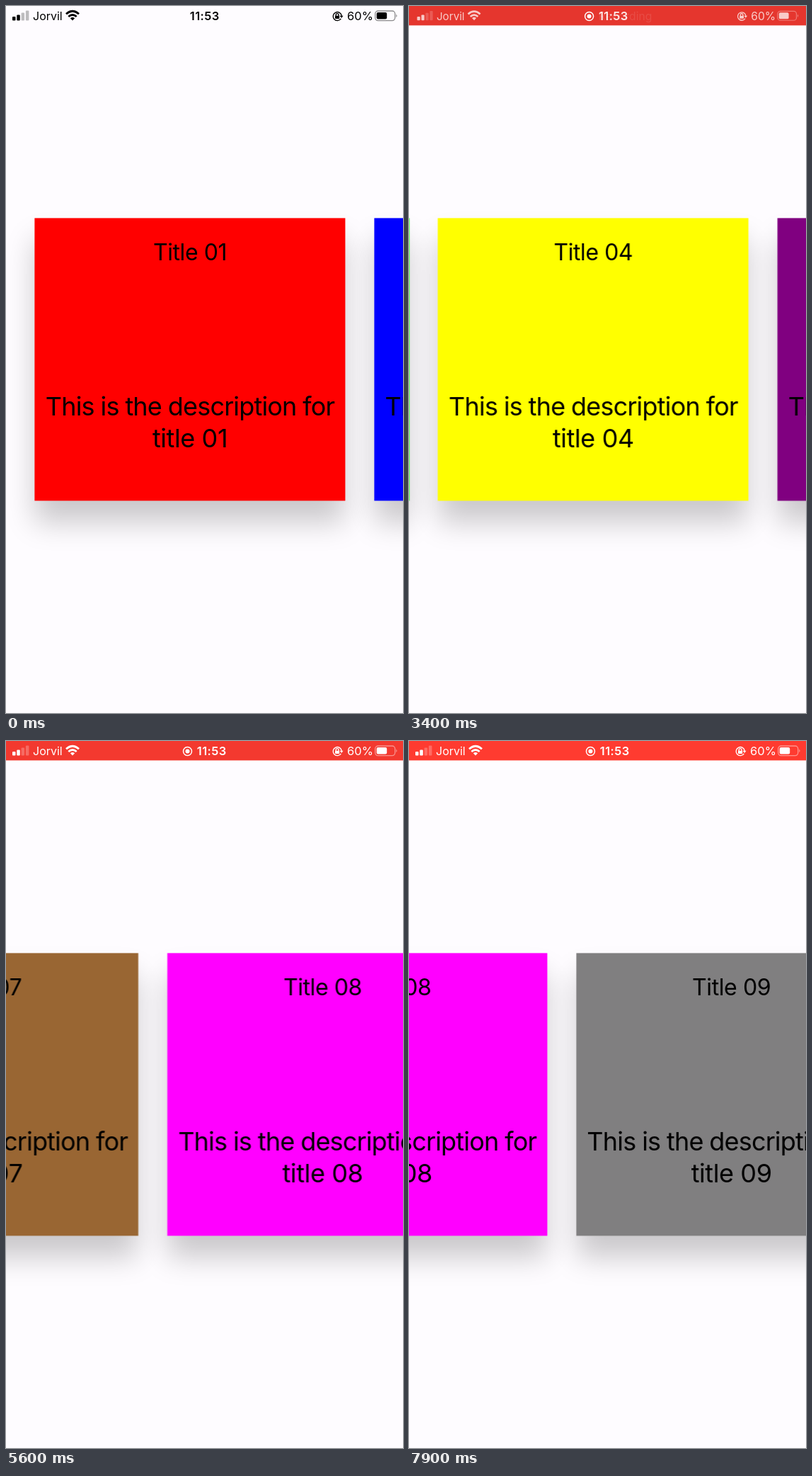
Write an HTML page that moves like this. It is 561x998 px and loops after 8000 ms.

```html
<!DOCTYPE html>
<html lang="en">
<head>
<meta charset="utf-8">
<title>Card carousel</title>
<style>
  html, body { margin: 0; width: 100%; height: 100%; overflow: hidden; background: #fefcff; }
  body { position: relative; font-family: Inter, Roboto, sans-serif; font-optical-sizing: none; color: #000; }
  #cards { position: absolute; left: 0; top: 299px; will-change: transform; }
  .card {
    position: absolute; top: 0; width: 439.3px; height: 399px;
    text-align: center; white-space: nowrap; line-height: 45px; letter-spacing: -.4px;
    box-shadow: 0 31px 39px rgba(0, 0, 0, .21);
  }
  .card div { position: absolute; left: 0; width: 100%; }
  .title { top: 25.6px; font-size: 32px; }
  .text { top: 243.6px; font-size: 36px; }
  .text span { letter-spacing: -.8px; word-spacing: -.6px; }
  svg { position: absolute; left: 0; top: 0; font-size: 16px; }
  .time { font-weight: 600; font-size: 16.5px; letter-spacing: .4px; }
</style>
</head>
<body>
<div id="cards"></div>
<svg width="561" height="30" fill="currentColor">
  <rect id="bar" width="561" height="27.4"/>
  <g id="left">
    <rect x="9" y="15" width="4.5" height="5.5" rx="1"/>
    <rect x="15.3" y="12.5" width="4.5" height="8" rx="1"/>
    <g opacity=".25">
      <rect x="21.6" y="9.5" width="4.5" height="11" rx="1"/>
      <rect x="27.9" y="6.5" width="4.5" height="14" rx="1"/>
    </g>
    <text x="38" y="20">Jorvil</text>
    <g fill="none" stroke="currentColor" stroke-width="2.8">
      <path d="M85 11.3Q94 3.3 103 11.3"/>
      <path d="M88.3 15Q94 10 99.7 15"/>
    </g>
    <path d="M94 20.5L90.8 17.2Q94 14.6 97.2 17.2Z"/>
  </g>
  <text id="clock" class="time" x="280.7" y="20" text-anchor="middle">11:53</text>
  <g id="right">
    <g fill="none" stroke="currentColor" stroke-width="1.4">
      <path d="M473.3 17.8A6 6 0 1 1 474.2 14"/>
      <path d="M466.2 14V12.5A1.9 1.9 0 0 1 470 12.5V14"/>
    </g>
    <rect x="465" y="13.7" width="6.2" height="4.3" rx=".7"/>
    <path d="M471.6 13.8H476.6L474.1 17Z"/>
    <text x="482" y="20" font-size="16.5">60%</text>
    <rect x="521.7" y="7" width="28" height="13.6" rx="4" fill="none" stroke="currentColor" stroke-width="1.3" opacity=".45"/>
    <path d="M551.3 11.5Q553.7 13.8 551.3 16.1Z" opacity=".5"/>
    <rect x="523.7" y="9" width="14.5" height="9.6" rx="2"/>
  </g>
  <g id="record" color="#fff" fill="#fff">
    <circle cy="14.5" r="6" fill="none" stroke="#fff" stroke-width="1.5"/>
    <circle cy="14.5" r="3"/>
    <text id="label" x="13" y="20" font-size="15.8">Recording</text>
    <text id="clock2" class="time" x="13.3" y="20">11:53</text>
  </g>
</svg>
<script>
const LOOP = 8000, STEP = 100, MARGIN = 40.4, PITCH = 479.7, SWIPE = 600;
const colors = ['#f00', '#00f', '#0f0', '#ff0', '#800080', '#ff8000', '#963', '#f0f', '#807f80', '#0ff'];
const forward = [1400, 2152, 2835, 3600, 4250, 4950, 5350, 5737, 6450];
const back = [7090, 7723];

const el = id => document.getElementById(id);
const [cards, bar, left, right, clock, record, label, clock2] =
  ['cards', 'bar', 'left', 'right', 'clock', 'record', 'label', 'clock2'].map(el);

cards.innerHTML = colors.map((color, i) => {
  const n = String(i + 1).padStart(2, '0');
  return `<div class="card" style="left:${i * PITCH}px;background:${color}">
    <div class="title">Title ${n}</div>
    <div class="text"><span>This is the description for</span><br>title ${n}</div></div>`;
}).join('');

const clamp = v => Math.min(1, Math.max(0, v));
const ramp = (t, from, to) => {
  const u = clamp((t - from) / (to - from));
  return u * u * (3 - 2 * u);
};
// A flick: quick pick-up by the finger, then a long deceleration.
const swipe = (t, start) => 1 - (1 - clamp((t - start) / SWIPE) ** 1.5) ** 3;
const total = (t, starts) => starts.reduce((sum, start) => sum + swipe(t, start), 0);

function group(node, cx, shown) {
  const s = .8 + .2 * shown;
  node.setAttribute('opacity', shown);
  node.setAttribute('transform', `translate(${cx} 14) scale(${s}) translate(${-cx} -14)`);
}

function draw(t) {
  const page = total(t, forward) - total(t, back);
  cards.style.transform = `translate(${MARGIN - page * PITCH}px, .4px)`;

  const red = ramp(t, 100, 500), swap = ramp(t, 3200, 3450);
  const pulse = clamp(.5 - .575 * Math.cos((t - 1000) / 2000 * 2 * Math.PI));
  const mix = (a, b) => Math.round(a + (b - a) * pulse);
  bar.setAttribute('fill', `rgb(${mix(217, 255)},${mix(52, 59)},${mix(45, 48)})`);
  bar.setAttribute('opacity', red);

  const early = t < 1000, shown = early ? 1 - red : ramp(t, 3200, 3500);
  left.style.color = right.style.color = early ? '#000' : '#fff';
  group(left, 56.5, shown);
  group(right, 507, shown);
  clock.setAttribute('opacity', 1 - red);

  record.setAttribute('opacity', red);
  record.setAttribute('transform', `translate(${238.5 + 18 * swap} 0)`);
  label.setAttribute('opacity', 1 - swap);
  clock2.setAttribute('opacity', swap);
}

function tick() {
  draw(Math.floor(performance.now() % LOOP / STEP) * STEP);
  requestAnimationFrame(tick);
}
tick();
</script>
</body>
</html>
```
